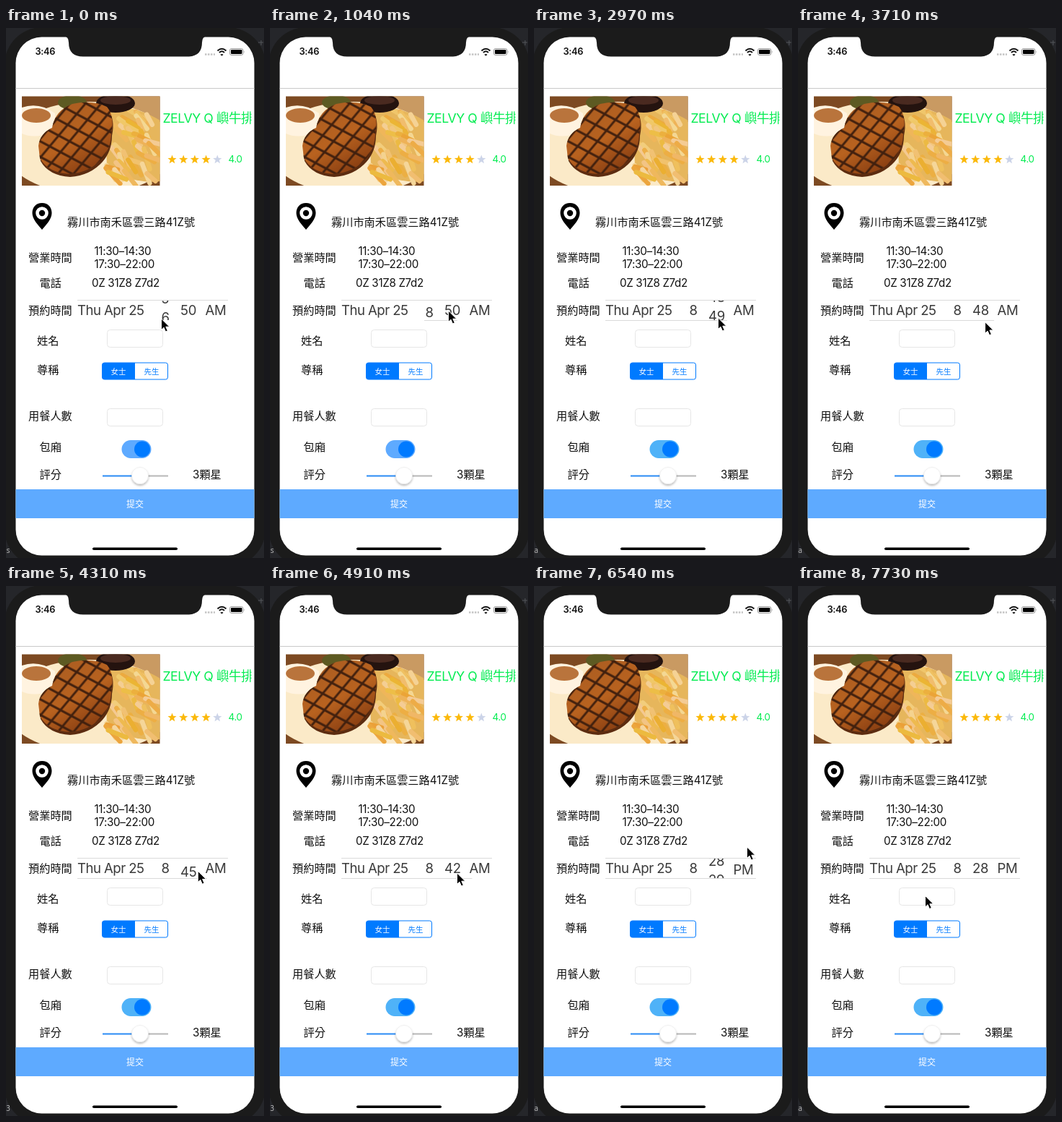
An HTML page that plays this animation: 358 px wide and 733 px high, repeating every 8000 ms.

```html
<!DOCTYPE html>
<html lang="zh-Hant">
<head>
<meta charset="utf-8">
<style>
html, body { margin: 0; width: 100%; height: 100%; overflow: hidden; background: #25262a; }
svg { display: block; }
text { font-family: Inter, "Noto Sans CJK TC", "Noto Sans CJK", sans-serif; font-size: 15.2px; fill: #111; white-space: pre; }
.num { letter-spacing: -.35px; }
.wheel text, .date { font-size: 18.6px; fill: #3a3a3a; letter-spacing: -.3px; }
.date { letter-spacing: -.55px; }
.small { font-size: 10.5px; text-anchor: middle; }
.green { fill: #05ec52; }
.field { fill: #fff; stroke: #e6e6e6; }
</style>
</head>
<body>
<svg width="358" height="733" viewBox="0 0 358 733">
  <defs>
    <clipPath id="screen"><rect x="13.500" y="12.500" width="331" height="717" rx="36"/></clipPath>
    <clipPath id="photo"><rect x="22" y="94.500" width="191.500" height="123.500"/></clipPath>
    <clipPath id="window"><rect x="99" y="377" width="210" height="27"/></clipPath>
    <clipPath id="title"><rect x="216" y="105" width="124.500" height="40"/></clipPath>
    <path id="steak" d="M45 163Q47 146 64 138Q68 114 92 105Q120 99 140 109Q151 122 146 145Q146 166 133 181Q116 200 88 202Q58 200 47 180Z"/>
    <linearGradient id="brown" x2=".6" y2="1"><stop stop-color="#a85c22"/><stop offset=".6" stop-color="#b8621f"/><stop offset="1" stop-color="#8a3f12"/></linearGradient>
    <pattern id="grill" width="17" height="19" patternUnits="userSpaceOnUse" patternTransform="rotate(28) skewX(-12)">
      <path d="M0 2H17M2 0V19" stroke="#41200e" stroke-width="3"/>
    </pattern>
    <filter id="shade" x="-40%" y="-40%" width="180%" height="200%"><feDropShadow dx="0" dy="2" stdDeviation="1.500" flood-opacity=".28"/></filter>
  </defs>

  <rect x="-2" y="-1" width="362" height="746" rx="52" fill="#1b1b1b"/>
  <path d="M350 20h7M354 17v7" stroke="#55565a"/>
  <text id="corner" y="726" style="font:10px 'Noto Sans Mono',monospace;fill:#b5b5b5"></text>
  <g clip-path="url(#screen)">
    <rect x="13" y="12" width="332" height="720" fill="#fff"/>
    <path d="M13 83.500H345" stroke="#c9c9c9"/>
    <rect x="13" y="638" width="332" height="40" fill="#5eaaff"/>
  </g>
  <path d="M80 11Q87 12 87 20Q87 39.500 107 39.500H252Q272 39.500 272 20Q272 12 279 11Z" fill="#1b1b1b"/>
  <rect x="120" y="718.500" width="118" height="3.500" rx="1.750"/>

  <text x="40.500" y="37" style="font-size:12.800px;font-weight:600" class="num">3:46</text>
  <path d="M276 36.500h14" stroke="#c4c4c4" stroke-width="2.500" stroke-dasharray="2.500 1.500"/>
  <g fill="none" stroke="#111" stroke-width="2">
    <path d="M293.500 31.500Q299.500 26 305.500 31.500M296 34Q299.500 30.500 303 34"/>
    <path d="M298 36.300L299.500 37.500L301 36.300" stroke-width="1.500"/>
    <rect x="310.500" y="28.500" width="18.500" height="9" rx="2.500" stroke="#999" stroke-width="1"/>
  </g>
  <rect x="312" y="30" width="15.500" height="6" rx="1.200"/>
  <path d="M330.500 31.500q1.500 1.500 0 3" fill="#999"/>

  <g clip-path="url(#photo)">
    <rect x="22" y="94" width="192" height="125" fill="#7d4a22"/>
    <path d="M160 94H214V150H160Z" fill="#c99a62"/>
    <ellipse cx="116" cy="166" rx="118" ry="64" fill="#fbeac8"/>
    <ellipse cx="92" cy="103" rx="20" ry="10" fill="#5d5a22"/>
    <path d="M138 112Q175 104 214 128V212Q180 216 140 196Z" fill="#e6b65c"/>
    <g id="fries" stroke-width="6.500" stroke-linecap="round"></g>
    <ellipse cx="152" cy="104" rx="27" ry="13" fill="#24130f"/>
    <ellipse cx="152" cy="100" rx="21" ry="6" fill="#4a2a20"/>
    <path d="M22 110Q46 102 68 118Q69 142 52 148Q35 152 22 146Z" fill="#fff3e0"/>
    <ellipse cx="42" cy="121" rx="20" ry="10" fill="#b9743c"/>
    <use href="#steak" fill="#5c2c10" x="1" y="4"/>
    <use href="#steak" fill="url(#brown)"/>
    <use href="#steak" fill="url(#grill)"/>
  </g>

  <g clip-path="url(#title)"><text class="green" x="217.500" y="131" style="font-size:17.700px;letter-spacing:-.5px">ZELVY Q 嶼牛排</text></g>
  <g id="stars"></g>
  <text class="green num" x="308.500" y="186" style="font-size:13.500px">4.0</text>

  <path d="M50 242C41.500 242 36.500 248 36.500 256C36.500 264 44 272 50 279C56 272 63.500 264 63.500 256C63.500 248 58.500 242 50 242Z"/>
  <circle cx="50" cy="256" r="6.500" stroke="#fff" stroke-width="4.600"/>

  <text x="31" y="323">營業時間</text>
  <text x="46.500" y="358">電話</text>
  <text x="31" y="396">預約時間</text>
  <text x="43" y="438">姓名</text>
  <text x="43" y="478">尊稱</text>
  <text x="31" y="542">用餐人數</text>
  <text x="46.500" y="585">包廂</text>
  <text x="46.500" y="623">評分</text>
  <g class="num">
    <text x="122.500" y="314">11:30–14:30</text>
    <text x="122.500" y="332">17:30–22:00</text>
    <text x="119" y="358">0Z 31Z8 Z7d2</text>
  </g>
  <text x="85" y="274">霧川市南禾區雲三路41Z號</text>

  <g stroke="#dadada"><path d="M99 376.500H308"/><path id="rule"/></g>
  <text class="date" x="99" y="397">Thu Apr 25</text>
  <g class="wheel" clip-path="url(#window)">
    <g id="hour"></g><g id="minute"></g><g id="half"></g>
  </g>

  <rect class="field" x="140.500" y="417.500" width="77" height="24" rx="4"/>
  <rect class="field" x="140.500" y="526.500" width="77" height="24" rx="4"/>

  <rect x="133.500" y="463" width="91" height="23" rx="3" fill="#fff" stroke="#007aff"/>
  <path d="M179 463V486H136.500Q133.500 486 133.500 483V466Q133.500 463 136.500 463Z" fill="#007aff"/>
  <text class="small" x="156" y="478.500" style="fill:#fff">女士</text>
  <text class="small" x="202" y="478.500" style="fill:#007aff">先生</text>

  <rect id="track" x="160.500" y="570" width="41" height="25" rx="12.500"/>
  <circle cx="189" cy="582.500" r="11" fill="#007aff"/>
  <path d="M134 619.500H186" stroke="#2a8bf5" stroke-width="2"/>
  <path d="M186 619.500H225" stroke="#b7b7b7" stroke-width="2"/>
  <circle cx="186" cy="619" r="11.500" fill="#fff" stroke="#e2e2e2" stroke-width=".5" filter="url(#shade)"/>
  <text x="259" y="623">3顆星</text>
  <text class="small" x="179" y="662.500" style="font-size:12px;fill:#fff">提交</text>

  <path id="cursor" d="M0 0V15.500L3.500 12.200L6 18L8.800 16.800L6.300 11.200H11.300Z" stroke="#fff"/>
</svg>
<script>
const $ = id => document.getElementById(id);
const LOOP = 8000, STEP = 148.65, LAST = 52;  // the picture advances in even steps
const ROW = 26, BASE = 397;

let seed = 7;
const rnd = (a, b) => a + (b - a) * ((seed = seed * 16807 % 2147483647) / 2147483647);
const repeat = (n, f) => Array.from({ length: n }, (_, i) => f(i)).join('');

const star = repeat(10, i => {
  const r = i % 2 ? 2.7 : 6.4, a = (i / 5 - .5) * Math.PI;
  return `${r * Math.cos(a)},${r * Math.sin(a)} `;
});
$('stars').innerHTML = repeat(5, i =>
  `<polygon points="${star}" transform="translate(${230.5 + i * 15.7} 182)" fill="${i < 4 ? '#fbb90b' : '#ccd4e8'}"/>`);

$('fries').innerHTML = repeat(48, i => {
  const x = rnd(138, 200), y = 112 + i * 1.9, a = rnd(.1, 1.3), l = rnd(14, 30);
  return `<path d="M${x} ${y}l${l * Math.cos(a)} ${l * Math.sin(a)}" stroke="hsl(${rnd(34, 43)} 82% ${rnd(55, 79)}%)"/>`;
});

// Pointer stops: time in ms, x, y
const stops = [
  [0, 215.5, 402], [1040, 247.5, 391], [1640, 247, 386], [2230, 251.5, 395], [3710, 259.5, 407],
  [4460, 268, 391], [4910, 259.5, 397], [5900, 290, 400], [6540, 295.5, 361], [7140, 251, 384],
  [7430, 183, 423], [7730, 176.5, 428.5]
];
function pointer(t) {
  const n = Math.max(1, stops.findIndex(s => s[0] >= t));
  const [t0, x0, y0] = stops[n - 1], [t1, x1, y1] = stops[n];
  const k = (t - t0) / (t1 - t0);
  return [x0 + (x1 - x0) * k, y0 + (y1 - y0) * k];
}

// A flick that slows to rest, from 0 to 1
const flick = (t, from, to) => 1 - (1 - Math.min(1, Math.max(0, (t - from) / (to - from)))) ** 2;

function wheel(id, x, pos, label) {
  const rows = new Set([Math.floor(pos), Math.ceil(pos)]);
  $(id).innerHTML = [...rows].map(i =>
    `<text x="${x}" y="${BASE + (i - pos) * ROW}">${label(i)}</text>`).join('');
}

const timeOf = step => Math.round(step * STEP / 10) * 10;

function draw(now) {
  const step = Math.min(LAST, Math.floor((now % LOOP + 7) / STEP));
  const t = timeOf(step), late = t >= 1640;

  wheel('hour', 215.5, 5.63 + 2.37 * flick(t, 0, 1340), i => i);
  wheel('minute', 242, 50 - flick(t, 1640, 2230) - flick(t, 2820, 3710)
    - 6 * flick(t, 4010, 4960) - 14 * flick(t, 5060, 6840), i => i);
  wheel('half', 276.5, flick(t, 5800, 6840), i => i ? 'PM' : 'AM');

  // The lower rule appears as far as the pointer has been
  let reach = 0;
  for (let s = 1; s <= step; s++) reach = Math.max(reach, pointer(timeOf(s))[0] + 12.5);
  $('rule').setAttribute('d', reach ? `M${late ? 99 : 214} 404.5H${reach}` : '');

  $('corner').textContent = 's9a3a'[Math.max(0, Math.min(4, Math.floor((t - 400) / 1200)))];
  $('track').setAttribute('fill', late ? '#4fb2f8' : '#5eaaff');
  $('cursor').setAttribute('transform', `translate(${pointer(t)})`);
}

const start = performance.now();
function loop() {
  draw(performance.now() - start);
  requestAnimationFrame(loop);
}
loop();
</script>
</body>
</html>
```
